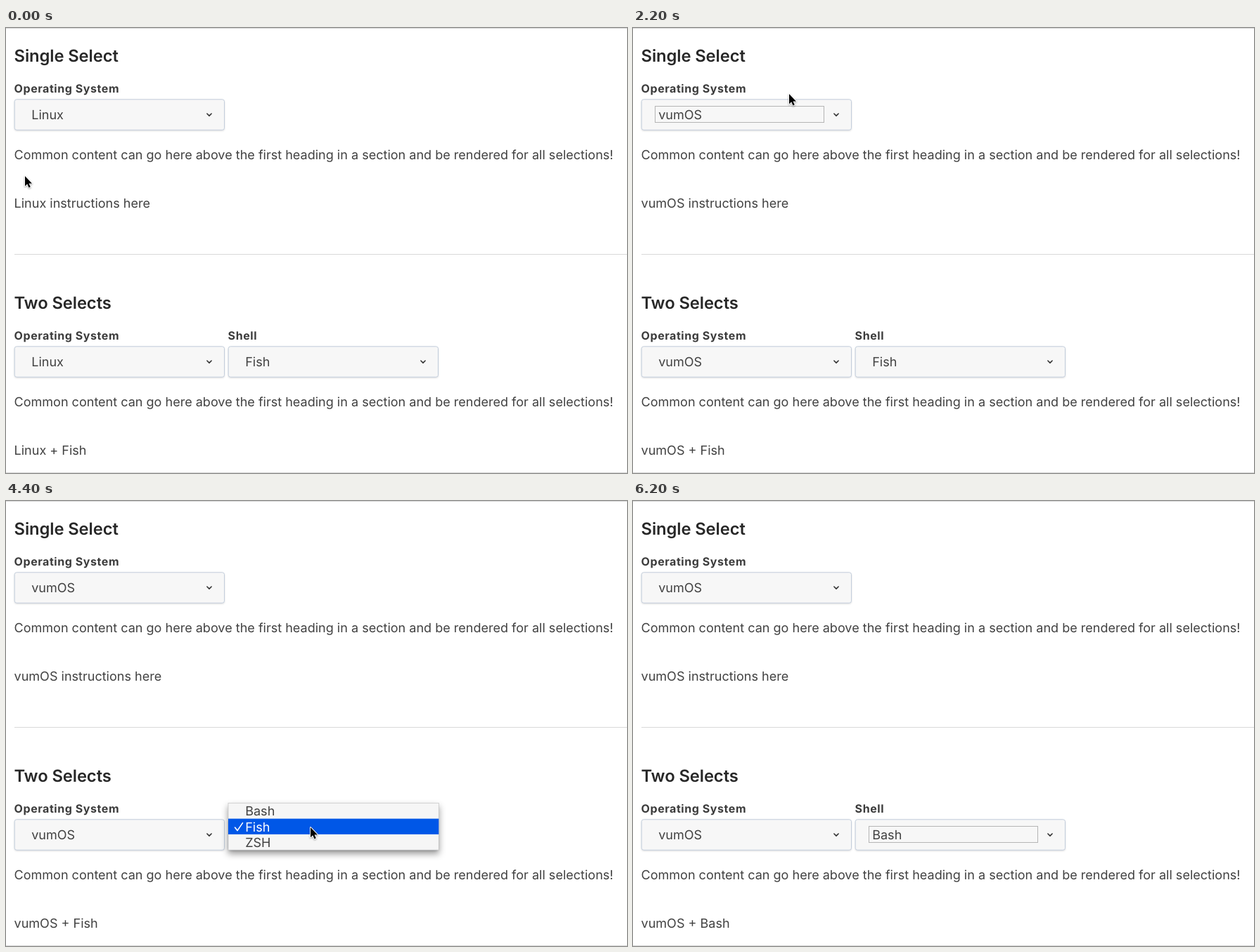
An HTML page for the animation above (6.4 s loop, 883 by 634 pixels).

```html
<!DOCTYPE html>
<html lang="en">
<head>
<meta charset="utf-8">
<title>Linked selects</title>
<style>
  html, body { margin: 0; width: 100%; height: 100%; overflow: hidden; background: #fff; }
  svg { display: block; }
  text { font: 18.05px Inter, sans-serif; fill: #414141; white-space: pre; text-rendering: geometricPrecision; }
  .heading { font-size: 23.8px; font-weight: 600; letter-spacing: -.1px; fill: #272727; }
  .label { font-size: 16px; font-weight: 700; letter-spacing: .56px; fill: #3b3b3b; }
  .rule { fill: #d9d9d9; }
  .box { fill: #f7f7f7; stroke: #c3cedc; filter: drop-shadow(0 1px 1px #0002); }
  .focus { fill: none; stroke: #b5b5b5; }
  .chevron, .check { fill: none; stroke: #333; stroke-width: 1.6; stroke-linecap: round; stroke-linejoin: round; }
  .panel { fill: #f6f6f6; stroke: #c4c4c4; stroke-width: .7; }
  .menu { filter: drop-shadow(0 5px 5px #0006); }
  .row { fill: none; }
  .active .row { fill: #0057e7; }
  .active text { fill: #fff; }
  .active .check { stroke: #fff; }
  #cursor { filter: drop-shadow(0 1px 1px #0005); }
  #cursor path { stroke: #fff; stroke-width: 2; stroke-linejoin: round; paint-order: stroke; }
</style>
</head>
<body>
<svg id="stage" width="883" height="634" viewBox="0 0 883 634"></svg>
<script>
const STEP = 200, LOOP = 6400, ROW = 22.3;
const $ = id => document.getElementById(id);

const text = (x, y, str, attrs = '') => `<text x="${x}" y="${y}" ${attrs}>${str}</text>`;
const rule = (x, y) => `<rect class="rule" x="${x}" y="${y}" width="883" height="1"/>`;

const select = (id, x, y, label) => `
  ${text(x - .4, y - 9, label, 'class="label"')}
  <g transform="translate(${x} ${y})">
    <rect class="box" x=".2" y=".5" width="298.3" height="43.5" rx="3"/>
    <rect class="focus" id="${id}Focus" x="19.5" y="10.2" width="240" height="23"/>
    ${text(24.2, 29, '', `id="${id}Value"`)}
    <path class="chevron" d="M273.9 20.7l3.1 3.1 3.1-3.1"/>
  </g>`;

const menu = (id, x, y, items, checked) => `
  <g class="menu" id="${id}" transform="translate(${x} ${y})">
    <rect class="panel" width="299.3" height="${items.length * ROW}"/>
    ${items.map((item, i) => `<g transform="translate(0 ${i * ROW})">
      <rect class="row" width="299.3" height="${ROW}"/>
      ${i === checked ? '<path class="check" d="M9.5 12.5l3.5 4.5 7.5-11"/>' : ''}
      ${text(24.2, 18, item)}
    </g>`).join('')}
  </g>`;

const section = (y, title) => `
  ${text(11.5, y + 48, title, 'class="heading"')}
  ${text(11.5, y + 187, 'Common content can go here above the first heading in a section and be rendered for all selections!')}`;

$('stage').innerHTML =
  rule(0, 0) + rule(12, 322) + rule(0, 633) +
  section(0, 'Single Select') + section(352, 'Two Selects') +
  select('single', 12, 101.3, 'Operating System') +
  select('os', 12, 453.3, 'Operating System') +
  select('shell', 316, 453.3, 'Shell') +
  text(11.5, 256, '', 'id="singleResult"') + text(11.5, 608, '', 'id="pairResult"') +
  menu('osMenu', 12, 78.3, ['vumOS', 'Linux'], 1) +
  menu('shellMenu', 316, 430.3, ['Bash', 'Fish', 'ZSH'], 1) +
  '<g id="cursor"><path transform="scale(.92)" d="M0 0V15.4L3.5 12.2 6 17.8 8.5 16.7 6 11.3H10.9Z"/></g>';

// Pointer tip: [time, x, y]
const track = [
  [0, 27, 211], [400, 95, 180], [800, 205, 137], [1000, 212, 134], [1200, 213, 131],
  [1400, 216, 118], [1600, 221, 98], [1800, 222, 94], [2400, 222, 94], [2600, 236, 118],
  [3000, 371, 322], [3400, 398, 427], [3600, 398, 427], [3800, 432, 466], [4400, 433, 465],
  [4600, 439, 453], [4800, 441, 449], [5600, 441, 449], [5800, 448, 484], [6000, 469, 599], [6400, 469, 660]
];

function pointAt(t) {
  const i = track.findIndex(p => p[0] > t);
  const [t0, x0, y0] = track[i - 1], [t1, x1, y1] = track[i];
  const k = (t - t0) / (t1 - t0);
  return [x0 + (x1 - x0) * k, y0 + (y1 - y0) * k];
}

const show = (id, on) => $(id).setAttribute('visibility', on ? 'visible' : 'hidden');
const write = (id, str) => { if ($(id).textContent !== str) $(id).textContent = str; };
const highlight = (id, active) =>
  $(id).querySelectorAll('g').forEach((row, i) => row.classList.toggle('active', i === active));

function render(t) {
  const within = (from, to) => t >= from && t < to;
  const os = t < 2200 ? 'Linux' : 'vumOS', shell = t < 5200 ? 'Fish' : 'Bash';
  write('singleValue', os);
  write('osValue', os);
  write('shellValue', shell);
  write('singleResult', os + ' instructions here');
  write('pairResult', os + ' + ' + shell);

  show('singleFocus', within(1000, 4200));
  show('osFocus', false);
  show('shellFocus', t >= 4200);
  show('osMenu', within(1000, 2200));
  show('shellMenu', within(4200, 5200));
  highlight('osMenu', t < 1600 ? 1 : 0);
  highlight('shellMenu', t < 4600 ? 1 : 0);

  show('cursor', t < 6200);
  $('cursor').setAttribute('transform', `translate(${pointAt(t)})`);
}

const start = performance.now();
function tick() {
  const t = (performance.now() - start) % LOOP;
  render(Math.floor(t / STEP) * STEP);
  requestAnimationFrame(tick);
}
tick();
</script>
</body>
</html>
```
